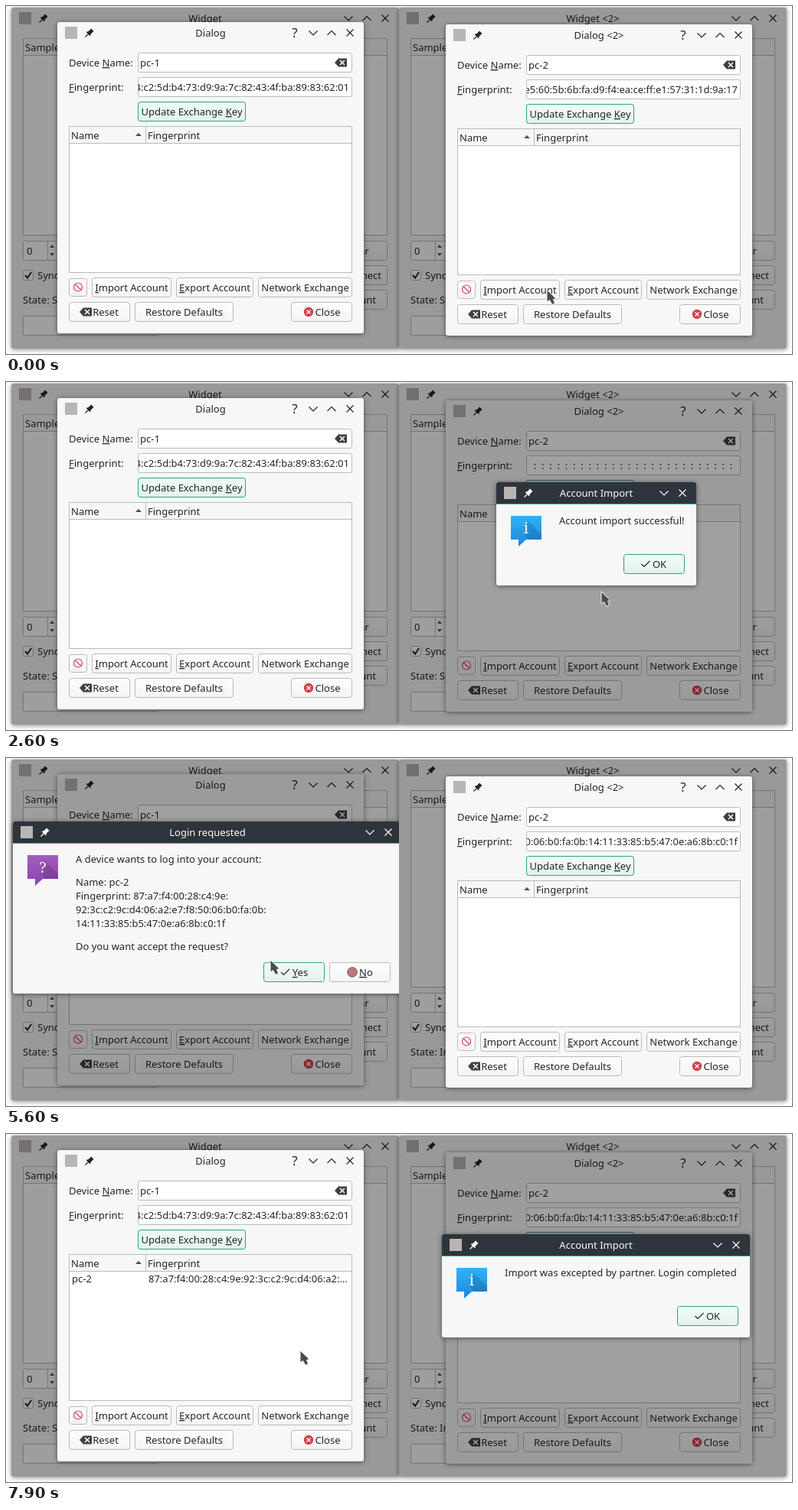
An HTML page for the animation above (8000 ms loop, 1026x455 px).

```html
<!DOCTYPE html>
<html lang="en">
<head>
<meta charset="utf-8">
<title>Account import</title>
<style>
html, body { margin: 0; width: 100%; height: 100%; overflow: hidden; background: #fff; }
svg { display: block; width: 1026px; height: 455px; }
text { font: 13px "Noto Sans", sans-serif; white-space: pre; }
.win { filter: drop-shadow(0 1px 3px rgba(0,0,0,.5)); }
.anim { animation: 8s linear infinite; }
.step { animation: 8s step-end infinite; }

#files { animation-name: files; }
#popup { animation-name: popup; }
#hover { animation-name: hover; }
#typed { animation-name: typed; }
#picked { animation-name: picked; }
#dim1 { animation-name: dim1; }
#dim2 { animation-name: dim2; }
#active2 { animation-name: active2; }
#msg1 { animation-name: msg1; }
#msg2 { animation-name: msg2; }
#login { animation-name: login; }
#oldKey { animation-name: oldKey; }
#noKey { animation-name: noKey; }
#newKey { animation-name: newKey; }
#syncState { animation-name: syncState; }
#initState { animation-name: initState; }
#focusImport { animation-name: focusImport; }
#focusUpdate { animation-name: focusUpdate; }
#row { animation-name: row; }
#cursor { animation: cursor 8s ease-in-out infinite; }

@keyframes files { 0%, 1.25% { opacity: 0 } 3.75%, 26.5% { opacity: 1 } 28.75%, 100% { opacity: 0 } }
@keyframes popup { 0%, 13.5% { opacity: 0 } 15%, 19.5% { opacity: 1 } 22%, 100% { opacity: 0 } }
@keyframes hover { 0% { opacity: 0 } 17%, 100% { opacity: 1 } }
@keyframes typed { 0% { opacity: 0 } 13% { opacity: 1 } 19.3%, 100% { opacity: 0 } }
@keyframes picked { 0% { opacity: 0 } 19.3%, 100% { opacity: 1 } }
@keyframes dim1 { 0%, 62.5% { opacity: 0 } 65.5%, 92.5% { opacity: .37 } 96%, 100% { opacity: 0 } }
@keyframes dim2 { 0%, 1.25% { opacity: 0 } 3.75%, 42.5% { opacity: .37 } 47.5%, 93.5% { opacity: 0 } 96.5%, 100% { opacity: .37 } }
@keyframes active2 { 0%, 42.5% { opacity: 0 } 47.5%, 62.5% { opacity: 1 } 64.5%, 100% { opacity: 0 } }
@keyframes msg1 { 0%, 29.5% { opacity: 0 } 31.5%, 40.5% { opacity: 1 } 42.5%, 100% { opacity: 0 } }
@keyframes msg2 { 0%, 94% { opacity: 0 } 96.25%, 100% { opacity: 1 } }
@keyframes login { 0%, 62.5% { opacity: 0 } 65%, 92% { opacity: 1 } 94%, 100% { opacity: 0 } }
@keyframes oldKey { 0% { opacity: 1 } 29%, 100% { opacity: 0 } }
@keyframes noKey { 0% { opacity: 0 } 29% { opacity: 1 } 62%, 100% { opacity: 0 } }
@keyframes newKey { 0% { opacity: 0 } 62%, 100% { opacity: 1 } }
@keyframes syncState { 0% { opacity: 1 } 40%, 100% { opacity: 0 } }
@keyframes initState { 0% { opacity: 0 } 40%, 100% { opacity: 1 } }
@keyframes focusImport { 0% { opacity: 0 } 42.5% { opacity: 1 } 62.5%, 100% { opacity: 0 } }
@keyframes focusUpdate { 0% { opacity: 1 } 42.5% { opacity: 0 } 62.5%, 100% { opacity: 1 } }
@keyframes row { 0% { opacity: 0 } 92.5%, 100% { opacity: 1 } }
@keyframes cursor {
  0%, 3% { transform: translate(706px, 371px) }
  9%, 14% { transform: translate(680px, 364px) }
  18%, 21% { transform: translate(656px, 378px) }
  25.5%, 27% { transform: translate(1012px, 366px) }
  32.5% { transform: translate(777px, 274px) }
  37% { transform: translate(843px, 240px) }
  43.75%, 50% { transform: translate(841px, 244px) }
  58.75%, 70% { transform: translate(345px, 264px) }
  88%, 92% { transform: translate(380px, 282px) }
  97%, 100% { transform: translate(384px, 283px) }
}
</style>
</head>
<body>
<svg id="stage" viewBox="0 0 1026 455">
  <defs>
    <linearGradient id="btn" x2="0" y2="1"><stop stop-color="#fdfdfd"/><stop offset="1" stop-color="#f3f4f4"/></linearGradient>
    <linearGradient id="hot" x2="0" y2="1"><stop stop-color="#f3faf8"/><stop offset="1" stop-color="#e2f2ee"/></linearGradient>
    <linearGradient id="blue" x2="0" y2="1"><stop stop-color="#2fb4f6"/><stop offset="1" stop-color="#1d86e0"/></linearGradient>
    <linearGradient id="purple" x2="0" y2="1"><stop stop-color="#a35cc0"/><stop offset="1" stop-color="#8a44ad"/></linearGradient>
    <clipPath id="keyClip"><path d="M173 94H451V119H173Z"/></clipPath>
    <clipPath id="listClip"><path d="M540 47H1026V344H540Z"/></clipPath>
    <clipPath id="half"><path d="M0 0H513V455H0Z"/></clipPath>
  </defs>
</svg>
<script>
const BODY = '#f7f7f7', LINE = '#b9bbbc', TEAL = '#2f9f8a', INK = '#232629';

const rect = (x, y, w, h, fill, stroke = 'none', r = 0, extra = '') =>
  `<rect x="${x}" y="${y}" width="${w}" height="${h}" rx="${r}" fill="${fill}" stroke="${stroke}" ${extra}/>`;
const box = (x, y, w, h, fill = '#fff', stroke = LINE, r = 2) =>
  rect(x + .5, y + .5, w - 1, h - 1, fill, stroke, r);
const path = (x, y, d, stroke = INK, fill = 'none', width = 1.2) =>
  `<path transform="translate(${x} ${y})" d="${d}" stroke="${stroke}" fill="${fill}" stroke-width="${width}"/>`;
// A tilde marks the underlined shortcut letter.
const text = (x, y, s, anchor = 'start', fill = INK, extra = '') =>
  `<text x="${x}" y="${y}" text-anchor="${anchor}" fill="${fill}" ${extra}>${
    s.replace(/~(.)/, '<tspan text-decoration="underline">$1</tspan>')}</text>`;
const group = (id, content, kind = 'anim') => `<g id="${id}" class="${kind}">${content}</g>`;
const line = (x, y, d) => path(x, y, d, LINE, 'none', 1);

const button = (x, y, w, label = '', hot = false, dx = 0) =>
  box(x, y, w, 26, `url(#${hot ? 'hot' : 'btn'})`, hot ? TEAL : LINE, 3) +
  text(x + w / 2 + dx, y + 18, label, 'middle');

const GLYPH = {
  help: (x, y, c) => text(x, y + 6, '?', 'middle', c, 'style="font-size:17px;font-weight:300"'),
  down: (x, y, c) => path(x, y, 'M-5.5-2.5L0 3 5.5-2.5', c),
  up: (x, y, c) => path(x, y, 'M-5.5 3L0-2.5 5.5 3', c),
  close: (x, y, c) => path(x, y, 'M-4.5-4.5L4.5 4.5M4.5-4.5L-4.5 4.5', c),
};
const check = (x, y) => path(x, y, 'M-5.5 0L-2 3.5 5.5-4');
const ban = (x, y, c) => path(x, y, 'M-5.5 0A5.5 5.5 0 1 1 5.5 0A5.5 5.5 0 1 1-5.5 0M-4-4L4 4', c);
const erase = (x, y) => path(x, y, 'M-8 0L-3-5.5H8V5.5H-3Z', 'none', '#3b4045') +
  path(x + 2, y, 'M-3-3L3 3M3-3L-3 3', '#fff', 'none', 1.5);
const folder = (x, y) => path(x, y, 'M-5.5-4.5H-1L.5-3H5.5V4.5H-5.5ZM-5.5-1.5H0L1.5-3H5.5', '#4a4f53');
const file = (x, y) => path(x, y, 'M-4-5.5H1.5L4.5-2.5V5.5H-4ZM1.5-5.5V-2.5H4.5', '#66696c', 'none', 1);
const lines = (x, y) => path(x, y, 'M-5.5-4.5H1M-5.5-1.5H6M-5.5 1.5H3M-5.5 4.5H6', '#66696c', 'none', 1);

function titleBar(x, y, w, title, controls, dark) {
  const c = dark ? '#fcfcfc' : INK;
  const back = dark
    ? path(x, y, `M0 28V3Q0 0 3 0H${w - 3}Q${w} 0 ${w} 3V28Z`, 'none', '#2e343b') + rect(x, y + 28, w, 1, '#3aa893')
    : '';
  return back + rect(x + 10, y + 6, 16, 16, '#b9b5b3') +
    path(x + 42, y + 14, 'M-4.5-1L1 4.5 2 1.2 5.5-2 2-5.5-1.2-2Z', 'none', c) +
    path(x + 42, y + 14, 'M-5.5 5.5L-1 1', c, 'none', 1.3) +
    text(x + w / 2, y + 19, title, 'middle', c) +
    controls.map((k, i) => GLYPH[k](x + w - 18 - 24 * (controls.length - 1 - i), y + 14, c)).join('');
}
const frame = (x, y, w, h) => rect(x, y, w, h, BODY, 'none', 3, 'class="win"');

function widget(title, state) {
  return frame(7, 2, 506, 446) + titleBar(7, 2, 506, title, ['down', 'up', 'close']) +
    box(22, 42, 476, 258, '#fff', LINE, 0) + rect(23, 43, 474, 21, BODY) + line(23, 64.5, 'M0 0H474') +
    text(25, 59, 'Sample') +
    box(22, 307, 60, 26) + text(27, 325, '0') + line(54.5, 308, 'M0 0V24') +
    path(60, 314, 'M-3 2L0-2 3 2Z', 'none', '#55595c') + path(60, 325, 'M-3-2L0 2 3-2Z', 'none', '#55595c') +
    box(22, 345, 14, 14) + path(29, 352, 'M-4 0L-1 3.5 4-4', INK, 'none', 2) + text(41, 357, 'Sync enabled') +
    text(22, 389, 'State:') + state +
    box(22, 405, 177, 26) +
    button(390, 307, 108) + text(474, 325, 'Clear', 'end') +
    button(390, 339, 108) + text(490, 357, 'Reconnect', 'end') +
    button(390, 371, 108) + text(483, 389, 'Edit Account', 'end') +
    rect(7, 2, 506, 446, '#000', 'none', 3, 'opacity=".38"');
}

const CONTROLS = ['help', 'down', 'up', 'close'];
function dialog(title, name, key, update, imp, extra, dim) {
  return frame(67, 21, 400, 407) + titleBar(67, 21, 400, title, CONTROLS) +
    text(82, 79, 'Device ~Name:') + box(172, 61, 280, 26) + text(175, 79, name) + erase(437, 74) +
    text(82, 111, '~Fingerprint:') + box(172, 93, 280, 26) + `<g clip-path="url(#keyClip)">${key}</g>` +
    button(172, 125, 141, 'Update Exchange ~Key') + update +
    box(82, 157, 370, 192, '#fff', LINE, 0) + rect(83, 158, 368, 21, BODY) + line(83, 179.5, 'M0 0H368') +
    line(182.5, 158, 'M0 0V21') + text(85, 174, 'Name') + text(185, 174, 'Fingerprint') +
    path(173, 168, 'M-4 2L0-2 4 2Z', 'none', '#4a4f53') +
    box(82, 356, 24, 24, 'url(#btn)', LINE, 3) + ban(94, 367.5, '#da4453') +
    button(112, 355, 104, '~Import Account') + imp +
    button(222, 355, 101, '~Export Account') + button(329, 355, 123, 'Network Exchange') +
    button(82, 387, 80, 'Reset', false, 8) + erase(104, 400) +
    button(168, 387, 129, 'Restore Defaults') +
    button(372, 387, 80, 'Close', false, 8) +
    '<circle cx="395" cy="400" r="6.2" fill="#d3404f"/>' + path(395, 400, 'M-2.5-2.5L2.5 2.5M2.5-2.5L-2.5 2.5', '#fff') +
    extra + group(dim, rect(67, 21, 400, 407, '#000', 'none', 3));
}
const keyText = s => text(448, 111, s, 'end');

const bubble = (x, y, fill, mark) =>
  path(x, y, 'M0 0H40V31H20L10 40V31H0Z', 'none', `url(#${fill})`) +
  path(x, y, 'M22 6L40 24V31H23L18 25Z', 'none', 'rgba(0,0,0,.12)') +
  `<text x="${x + 20}" y="${y + 23}" text-anchor="middle" fill="#f6f3ee" style="font:20px 'Noto Serif',serif">${mark}</text>`;

const message = (x, w, s, sx) =>
  frame(x, 131, w, 135) + titleBar(x, 131, w, 'Account Import', ['down', 'close'], true) +
  bubble(x + 19, 175, 'blue', 'i') + text(sx, 186, s) +
  button(x + w - 95, 225, 80, 'OK', true, 7) + check(x + w - 66, 238);

function loginBox() {
  const rows = [[137, 'A device wants to log into your account:'], [167, 'Name: pc-2'],
    [185, 'Fingerprint: 87:a7:f4:00:28:c4:9e:'], [203, '92:3c:c2:9c:d4:06:a2:e7:f8:50:06:b0:fa:0b:'],
    [221, '14:11:33:85:b5:47:0e:a6:8b:c0:1f'], [251, 'Do you want accept the request?']];
  return '<g clip-path="url(#half)">' + frame(9, 83, 508, 225) +
    titleBar(9, 83, 508, 'Login requested', ['down', 'close'], true) + bubble(28, 127, 'purple', '?') +
    rows.map(([y, s]) => text(91, y, s)).join('') +
    button(336, 267, 80, '~Yes', true, 8) + check(364.5, 280) +
    button(422, 267, 80, '~No', false, 8) +
    '<circle cx="452" cy="280" r="6.3" fill="#b9787b" stroke="#85595b"/></g>';
}

const FILES = `akonadi-tov.1MIOu4|d|11:53
hsperfdata_tov|d|13:49
kde-tov|d|12:24
kdeconnect_tov|d|11:53
QtCreator-IeedpG|d|13:49
sni-qt_simplescre…rder_24261-ZYF8fH|d|13:51
systemd-private-7…rd.service-A4jx6O|d|11:52
systemd-private-7…pd.service-2pGM61|d|11:52
keepassxc-tov.lock|l|11:53
qipc_sharedmemo…48b1461629c9f02|f|11:53
qipc_sharedmemo…f59513146b603ce|f|13:49
qipc_systemsem_…48b1461629c9f02|f|11:53
qipc_systemsem_q…ff59513146b603ce|f|13:49
qsingleinstance-velnarop-4479.lock|l|11:53`.split('\n').map(s => s.split('|'));
const KINDS = { d: [folder, '', 'Folder'], l: [lines, '32 Bytes', 'lock File'], f: [file, '0 Bytes', 'File'] };

function fileDialog() {
  const list = FILES.map(([name, kind, time], i) => {
    const y = 83 + 20 * i, [icon, size, type] = KINDS[kind];
    return icon(551, y - 5) + text(565, y, name) + text(865, y, size, 'end') +
      text(871, y, type) + text(937, y, '26.01.18 ' + time);
  }).join('');
  const heads = [[560, 'Name'], [808, 'Size'], [870, 'Type'], [936, 'Date Modified']];
  const popup = rect(548, 376, 442, 52, '#fcfcfc', 'none', 0, 'class="win"') +
    group('hover', rect(548, 376, 442, 24, '#45bfa8'), 'step') +
    file(565, 388) + text(582, 393, 'test.json', 'start', '#fff', 'id="hover" class="step"') +
    file(565, 412) + text(582, 417, 'tmp.9hbbvW08Rj', 'start', '#4c5054');
  return rect(450, -28, 620, 452, '#fbfbfb', 'none', 3, 'class="win"') + rect(450, 0, 576, 1, '#2e343b') +
    rect(450, 1, 576, 1, '#3aa893') +
    text(465, 31, 'Look in:') + box(548, 13, 336, 26, 'url(#btn)') + folder(562, 26) + text(573, 31, '/tmp') +
    path(872, 26, 'M-4-2L0 2 4-2Z', 'none', '#4a4f53') +
    path(904, 26, 'M3-5.5L-3 0 3 5.5', '#999') + path(935, 26, 'M-3-5.5L3 0-3 5.5', '#999') +
    GLYPH.up(967, 26, INK) + folder(998, 25) + path(1003, 30, 'M-3 0H3M0-3V3', INK, 'none', 1.5) +
    path(1024, 26, 'M0-5H9M0 0H9M0 5H9') +
    box(465, 46, 70, 299, '#fff', LINE, 0) +
    path(480, 59, 'M-7-6H7V4H-7ZM-4 7H4M0 4V7', '#4a4f53') + text(497, 64, 'Co…') +
    `<g transform="translate(480 85) scale(1.3)">${folder(0, 0)}</g>` + text(499, 90, 'tov') +
    path(537.5, 189, 'M0 0V14', '#aaa', 'none', 1).replace('/>', ' stroke-dasharray="1 2"/>') +
    box(539, 46, 500, 299, '#fff', LINE, 0) + rect(540, 47, 486, 20, BODY) + line(540, 67.5, 'M0 0H486') +
    line(0, 47, 'M804.5 0V20M866.5 0V20M932.5 0V20') + heads.map(([x, s]) => text(x, 62, s)).join('') +
    path(796, 56, 'M-4-2L0 2 4-2Z', 'none', '#4a4f53') +
    `<g clip-path="url(#listClip)">${list}</g>` +
    text(465, 369, 'File name:') + box(548, 351, 442, 26, '#fff', TEAL) +
    group('typed', text(551, 369, 't'), 'step') + group('picked', text(551, 369, 'test.json'), 'step') +
    button(997, 351, 80) + folder(1018, 364) +
    text(465, 401, 'Files of type:') + box(548, 383, 442, 26, 'url(#btn)') + text(553, 401, 'All Files (*)') +
    path(978, 396, 'M-4-2L0 2 4-2Z', 'none', '#4a4f53') +
    button(997, 383, 80) + ban(1015, 396, '#4a4f53') + text(1023, 401, 'Cancel') +
    group('popup', popup);
}

const updateHot = button(172, 125, 141, 'Update Exchange ~Key', true);
const keys2 =
  group('oldKey', keyText('e5:60:5b:6b:fa:d9:f4:ea:ce:ff:e1:57:31:1d:9a:17'), 'step') +
  group('noKey', text(175, 111, '  :'.repeat(26)), 'step') +
  group('newKey', keyText('50:06:b0:fa:0b:14:11:33:85:b5:47:0e:a6:8b:c0:1f'), 'step');
const newRow = group('row', text(86, 194, 'pc-2') + text(186, 194, '87:a7:f4:00:28:c4:9e:92:3c:c2:9c:d4:06:a2:…'), 'step');
const states2 = group('syncState', text(60, 389, 'Synchronized'), 'step') +
  group('initState', text(60, 389, 'Initializing'), 'step');
const shift = (x, y, content) => `<g transform="translate(${x} ${y})">${content}</g>`;

document.getElementById('stage').insertAdjacentHTML('beforeend',
  widget('Widget', text(60, 389, 'Synchronized')) +
  shift(506, 0, widget('Widget &lt;2&gt;', states2)) +
  dialog('Dialog', 'pc-1', keyText('94:c2:5d:b4:73:d9:9a:7c:82:43:4f:ba:89:83:62:01'), updateHot, '', newRow, 'dim1') +
  shift(507, 3, dialog('Dialog &lt;2&gt;', 'pc-2', keys2, group('focusUpdate', updateHot, 'step'),
    group('focusImport', button(112, 355, 104, '~Import Account', true), 'step'),
    group('active2', titleBar(67, 21, 400, 'Dialog &lt;2&gt;', CONTROLS, true)), 'dim2')) +
  group('login', loginBox()) +
  group('msg1', message(640, 261, 'Account import successful!', 722)) +
  group('msg2', message(569, 402, 'Import was excepted by partner. Login completed', 651)) +
  group('files', fileDialog()) +
  group('cursor', path(0, 0, 'M0 0V16L3.5 13.5 7 19.5 10.5 17.5 8.5 12.5 12 11.5Z', '#f4f4f4', '#4b4b4b', 1), ''));
</script>
</body>
</html>
```
